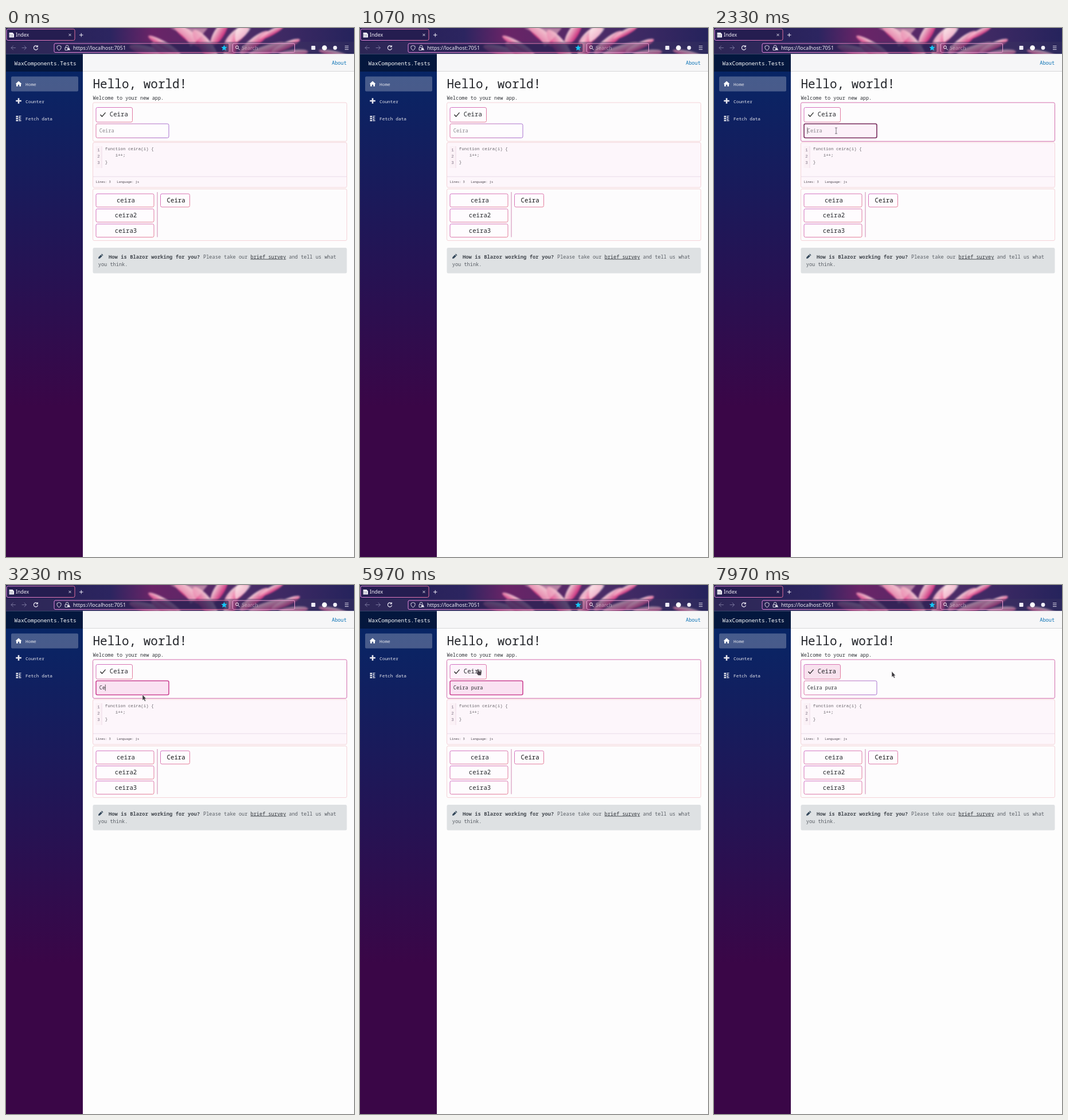
Animation, 607 px wide and 922 px high, one loop 8000 ms. Source, as an HTML page:

```html
<!DOCTYPE html>
<html lang="en">
<head>
<meta charset="utf-8">
<title>Index</title>
<style>
  html, body { margin: 0; width: 100%; height: 100%; overflow: hidden; background: #fdfdfd; }
  svg { display: block; width: 100%; height: 100%; }
  text { font-family: "Noto Sans Mono", "DejaVu Sans Mono", monospace; white-space: pre; }
  .ui { font-family: "Noto Sans", "Open Sans", sans-serif; }
  .code { font-family: "Liberation Mono", monospace; }
</style>
</head>
<body>
<svg id="stage" viewBox="0 0 607 922" preserveAspectRatio="none"></svg>
<script>
const stage = document.getElementById('stage');
const LOOP = 8000;

const rect = (x, y, w, h, fill, more = '') =>
  `<rect x="${x}" y="${y}" width="${w}" height="${h}" fill="${fill}" ${more}/>`;
const text = (x, y, size, fill, str, more = '') =>
  `<text x="${x}" y="${y}" font-size="${size}" fill="${fill}" ${more}>${str}</text>`;
const line = (d, color, width = 1, more = '') =>
  `<path d="${d}" fill="none" stroke="${color}" stroke-width="${width}" ${more}/>`;
const shape = (d, fill, more = '') => `<path d="${d}" fill="${fill}" ${more}/>`;
const disc = (x, y, r, fill) => `<circle cx="${x}" cy="${y}" r="${r}" fill="${fill}"/>`;
const box = (x, y, w, h, more = '') =>
  rect(x, y, w, h, '#fefcfe', `rx="2.5" stroke="url(#edge)" ${more}`);
const panel = (id, y, h, fill) =>
  rect(151.5, y, 443, h, fill, `id="${id}" rx="2.5" stroke="#f4d3d8"`);
const grad = (id, stops, dir = 'x2="0" y2="1"') =>
  `<linearGradient id="${id}" ${dir}>` +
  stops.map(([at, c]) => `<stop offset="${at}" stop-color="${c}"/>`).join('') +
  '</linearGradient>';

const defs = `<defs>
  ${grad('side', [[0, '#052767'], [.7, '#3a0647']])}
  ${grad('sky', [[0, '#241d50'], [.3, '#2c2560'], [.42, '#6a2467'], [.7, '#4a2c67'], [1, '#25235c']], '')}
  ${grad('petal', [[0, '#f9dce2'], [.45, '#f08fb4'], [1, '#d32c7d']])}
  ${grad('edge', [[0, '#d16fc4'], [1, '#e57f96']], 'x2="1" y2="1"')}
  ${grad('field', [[0, '#dc78a8'], [1, '#a871cf']], '')}
  ${grad('rim', [[0, '#e58be0'], [1, '#e0709f']], '')}
  <filter id="soft"><feGaussianBlur stdDeviation="1.6"/></filter>
  <clipPath id="top"><rect width="607" height="45.5"/></clipPath>
</defs>`;

// x, y, rx, ry, angle
const petals = [
  [248, 40, 34, 8, 14], [285, 44, 36, 9, 28], [276, 30, 32, 6, 30],
  [318, 13, 31, 9, 38], [348, 31, 34, 11, 52], [372, 9, 25, 9, -58],
  [402, 14, 27, 10, -42], [392, 36, 25, 10, -70], [433, 25, 31, 8, -38],
  [455, 38, 35, 8, -18], [488, 31, 27, 6, -24], [463, 8, 24, 5, -28],
  [501, 44, 26, 6, -6], [573, 45, 28, 5, 12]
];

function browser() {
  const flower = petals.map(([x, y, rx, ry, a]) =>
    `<ellipse cx="${x}" cy="${y}" rx="${rx}" ry="${ry}" fill="url(#petal)" opacity=".92" transform="rotate(${a} ${x} ${y})"/>`).join('');
  const white = 'stroke-linecap="round" stroke-linejoin="round"';
  return `<g clip-path="url(#top)">${rect(0, 0, 607, 46, 'url(#sky)')}
    <g filter="url(#soft)">${flower}
      ${shape('M286 0L352 0Q336 20 322 33Q313 10 286 0', '#f4bccb', 'opacity=".6"')}
      ${shape('M403 0L427 0Q421 13 401 25Q397 12 403 0', '#fff0f0', 'opacity=".7"')}
    </g>
    ${rect(0, 24, 607, 22, '#3b3560', 'opacity=".38"')}</g>
    ${rect(1, 2, 119, 19.5, '#251d50', 'rx="2.5" stroke="url(#rim)"')}
    ${shape('M5.5 8h6l2.5 2.5v6h-8.500z', '#eeeef6')}
    ${line('M7 10v5M9 12h3M9 14h3', '#77778c', .7)}
    ${text(17, 15.4, 8.7, '#f5f2fa', 'Index', 'class="ui"')}
    ${line('M109.500 10l4 4m0-4l-4 4', '#f0eef8', .9)}
    ${line('M128 12.200h6.500m-3.250-3.250v6.500', '#f0eef8')}
    ${line('M16.500 34.500H9m3.500-3.500L9 34.500l3.500 3.500M28 34.500h7.500m-3.500-3.500l3.500 3.500-3.500 3.500', '#77739b', 1, white)}
    ${line('M55 32.500a3.600 3.600 0 1 0 .4 3.200M55.300 30.500v2.500h-2.600', '#f0eef8', 1.1, white)}
    ${rect(84, 27, 305, 15.5, '#241d50', 'fill-opacity=".62" rx="2" stroke="url(#rim)"')}
    ${line('M92.500 30.500l3.500 1.300v3q-.5 2.700-3.500 4.200q-3-1.500-3.500-4.200v-3z', '#eceaf5', .9)}
    ${line('M104.300 34v-1.500a2.300 2.300 0 0 1 4.600 0v1.500M103 34.200h4.500v4.300h-4.500z', '#eceaf5', .9)}
    ${shape('M109.500 33.500l2.700 5h-5.400z', '#eceaf5')}
    ${text(117, 37.9, 9, '#f4f2fa', 'https://localhost:7051', 'class="ui"')}
    ${shape('M380.500 29.500l1.500 3.300 3.600.4-2.700 2.400.8 3.600-3.200-1.800-3.200 1.800.8-3.600-2.700-2.400 3.600-.4z', '#16c5f4')}
    ${rect(395.5, 27, 108, 15.500, '#4a2455', 'fill-opacity=".16" rx="2" stroke="#ef9fd4"')}
    <circle cx="403" cy="33.500" r="2.500" fill="none" stroke="#fff"/>
    ${line('M405 35.500l2.500 2.700', '#fff')}
    ${text(411, 37.900, 9, '#fff', 'Search', 'class="ui" opacity=".45"')}
    ${rect(532.5, 31, 7, 7, '#efedf7', 'rx="1"')}
    ${disc(555.5, 34.5, 4.3, '#fff')}${disc(574, 34.5, 3.4, '#f1eff8')}
    ${line('M591 31.500h6.500M591 34.500h6.500M591 37.500h6.500', '#f0eef8', .9)}`;
}

function sidebar() {
  const item = (y, label) => text(34, y, 7.85, '#e3e4eb', label, 'font-weight="500"');
  return rect(0, 45.5, 134, 877, 'url(#side)') +
    rect(0, 45.5, 134, 30.5, '#000', 'opacity=".4"') +
    text(14.5, 64.5, 9.5, '#fff', 'WaxComponents.Tests', 'font-weight="500"') +
    rect(9, 84.5, 117, 26, '#fff', 'rx="2" opacity=".25"') +
    shape('M22 92.500l5.500 5h-1.500v4.300h-2.700v-3h-2.600v3H18v-4.300h-1.500z', '#fff') +
    line('M22 122.300v9.500M17.200 127h9.600', '#e8e8ef', 2.6) +
    shape('M17.500 153h3.500v2.500h-3.500zM17.500 156.600h3.500v2.400h-3.500zM17.500 160h3.500v2.400h-3.500zM22 153h4.500v1H22zM22 155h3v1h-3zM22 156.600h4.500v1H22zM22 158.500h3v1h-3zM22 160h4.500v1H22zM22 161.700h4.500v.8H22z', '#e3e4eb') +
    item(101, 'Home') + item(131, 'Counter') + item(161, 'Fetch data');
}

function page() {
  const ink = '#25272b', soft = '#68646a';
  const rows = ['ceira', 'ceira2', 'ceira3'].map((name, i) =>
    box(157, 289 + i * 26.3, 101, 23) +
    text(209, 304 + i * 26.4, 10.7, ink, name, 'text-anchor="middle"')).join('');
  const numbers = [1, 2, 3].map(n =>
    text(159.3, 203.8 + n * 11.2, 7.4, '#85788a', n, 'class="code"')).join('');
  return rect(134, 45.5, 473, 877, '#fdfdfd') +
    rect(134, 45.5, 473, 30, '#f6f6f7') + line('M134 75.500H607', '#d8d7d9') +
    text(568.3, 63.600, 8.6, '#0a72b5', 'About') +
    text(151.500, 105, 21, '#222429', 'Hello, world!') +
    text(151.500, 124.500, 8.600, '#303338', 'Welcome to your new app.') +
    panel('p1', 130, 67.500, '#fdfcfd') +
    box(157, 138.500, 63.500, 25.500, 'id="check"') +
    line('M164.500 151l3 3.300 6-7', '#222', 1.300) +
    text(180.800, 154, 10.700, ink, 'Ceira') +
    rect(157, 167, 127, 24.500, '#fefcfe', 'id="input" rx="2.500"') +
    text(162.800, 182, 8.600, '#8a878c', '', 'id="value"') +
    line('M0 173.500v11', '#333', .8, 'id="caret"') +
    panel('p2', 199.500, 78.500, '#fdf6fb') +
    rect(156.500, 206, 10, 38, '#fbf1f6') + line('M167 206v38', '#eed9e6') + numbers +
    text(172.800, 213, 7.450, soft, 'function ceira(i) {', 'class="code"') +
    text(190.700, 224.300, 7.450, soft, 'i++;', 'class="code"') +
    text(172.800, 235.600, 7.450, soft, '}', 'class="code"') +
    line('M152 259H594', '#e9dae8') +
    text(156.800, 270, 5.400, '#4b454d', 'Lines: 3') +
    text(193.300, 270, 5.400, '#4b454d', 'Language: js') +
    panel('p3', 280.500, 90, '#fdfcfd') + rows +
    line('M264 286v78.500', '#cf86b2') +
    box(269.500, 289, 51, 23) + text(280.600, 304, 10.700, '#111', 'Ceira') +
    rect(151.500, 383, 443, 44.500, '#dee1e3', 'rx="2.500"') +
    shape('M161 402l.5-2.800 4-4 2.400 2.400-4 4zM166.200 394.600l1-1 2.300 2.300-1 1z', '#33475a') +
    text(179, 401.600, 8.850, '#464b52', 'How is Blazor working for you?', 'font-weight="600"') +
    text(344, 401.600, 8.600, '#595e65', 'Please take our') +
    text(426.500, 401.600, 8.600, '#33373d', 'brief survey', 'text-decoration="underline"') +
    text(493.500, 401.600, 8.600, '#595e65', 'and tell us what') +
    text(160.800, 414.600, 8.600, '#595e65', 'you think.');
}

const pointer = `<g id="arrow">${shape('M0 0v10l2.300-1.700 1.700 3.500 1.700-.8-1.600-3.500h2.700z', '#3d3a3f', 'stroke="#fff" stroke-width=".5"')}</g>
  <g id="beam">${line('M-2-5h4M-2 5h4M0-5v10', '#77717a', 1)}</g>
  <g id="hand">${shape('M-1.500 1q0-1.500 1.300-1.500t1.300 1.500v2l4 1q1 .5.800 2l-.8 4.500h-5l-3.500-4.500 1.900-.5z', '#4a434b', 'stroke="#eee" stroke-width=".4"')}</g>`;

stage.innerHTML = defs + browser() + sidebar() + page() + `<g id="mouse">${pointer}</g>`;
const $ = id => document.getElementById(id);
const set = (id, attrs) => {
  for (const k in attrs) $(id).setAttribute(k, attrs[k]);
};
const show = (id, on) => set(id, { visibility: on ? 'visible' : 'hidden' });

// time, x, y
const path = [[1240, 372, 621], [1640, 290, 213], [1720, 290, 213], [2030, 213, 179],
  [2600, 213, 179], [2900, 238, 191], [5480, 238, 191], [5900, 206, 147],
  [7540, 206, 147], [7900, 310, 150.5]];
// time, text after the key press
const keys = [[3050, 'C'], [3200, 'Ce'], [3330, 'Cei'], [3470, 'Ceir'], [3600, 'Ceira'],
  [3830, 'Ceira '], [4080, 'Ceira p'], [4320, 'Ceira pr'], [4650, 'Ceira p'],
  [4830, 'Ceira pu'], [4990, 'Ceira pur'], [5130, 'Ceira pura']];
const FOCUS = 2250, CLICK = 6300;

const ramp = (t, from, span = 200) => Math.min(1, Math.max(0, (t - from) / span));
const ease = u => u * u * (3 - 2 * u);
const mix = (a, b, u) => a + (b - a) * u;
const blend = (a, b, u) => `rgb(${a.map((v, i) => Math.round(mix(v, b[i], u)))})`;

function mouseAt(t) {
  const next = path.findIndex(p => p[0] > t);
  if (next < 0) return path[path.length - 1].slice(1);
  if (!next) return path[0].slice(1);
  const a = path[next - 1], b = path[next];
  const u = ease((t - a[0]) / (b[0] - a[0]));
  return [mix(a[1], b[1], u), mix(a[2], b[2], u)];
}

function draw(t) {
  const [x, y] = mouseAt(t);
  const inside = (l, top, r, b) => x > l && x < r && y > top && y < b;
  const overInput = inside(157, 167, 284, 190), overCheck = inside(157, 138, 221, 164);
  set('mouse', { transform: `translate(${x} ${y})` });
  show('arrow', t >= 1240 && !overInput && !overCheck);
  show('beam', t >= 1240 && overInput);
  show('hand', t >= 1240 && overCheck);

  const idle = [244, 211, 216], hover = [211, 110, 173];
  set('p1', { stroke: blend(idle, hover, ramp(t, 1890)) });
  set('p2', { stroke: blend(idle, hover, ramp(t, 1560) * (1 - ramp(t, 1870))) });

  const focused = t >= FOCUS && t < CLICK;
  const glow = ramp(t, FOCUS) * (1 - ramp(t, CLICK));
  const pressed = t < 2600 ? [119, 43, 92] : [204, 70, 148];
  set('input', {
    fill: blend([254, 252, 254], [250, 226, 242], glow),
    stroke: focused ? blend([207, 112, 180], pressed, ramp(t, FOCUS, 80)) : 'url(#field)',
    'stroke-width': focused ? 1.6 : 1
  });
  const tint = blend([254, 252, 254], [248, 226, 238], ramp(t, CLICK));
  set('check', { fill: overCheck && t < CLICK ? '#fdf3fb' : tint });

  const key = keys.filter(k => k[0] <= t).pop();
  $('value').textContent = key ? key[1] : 'Ceira';
  set('value', { fill: key ? '#303035' : '#8a878c' });
  const since = t - (key ? key[0] : FOCUS);
  set('caret', { transform: `translate(${163 + (key ? key[1].length : 0) * 5.16} 0)` });
  show('caret', focused && since % 1000 < 500 && t < 5700);
}

function tick(now) {
  draw(now % LOOP);
  requestAnimationFrame(tick);
}
draw(0);
requestAnimationFrame(tick);
</script>
</body>
</html>
```
